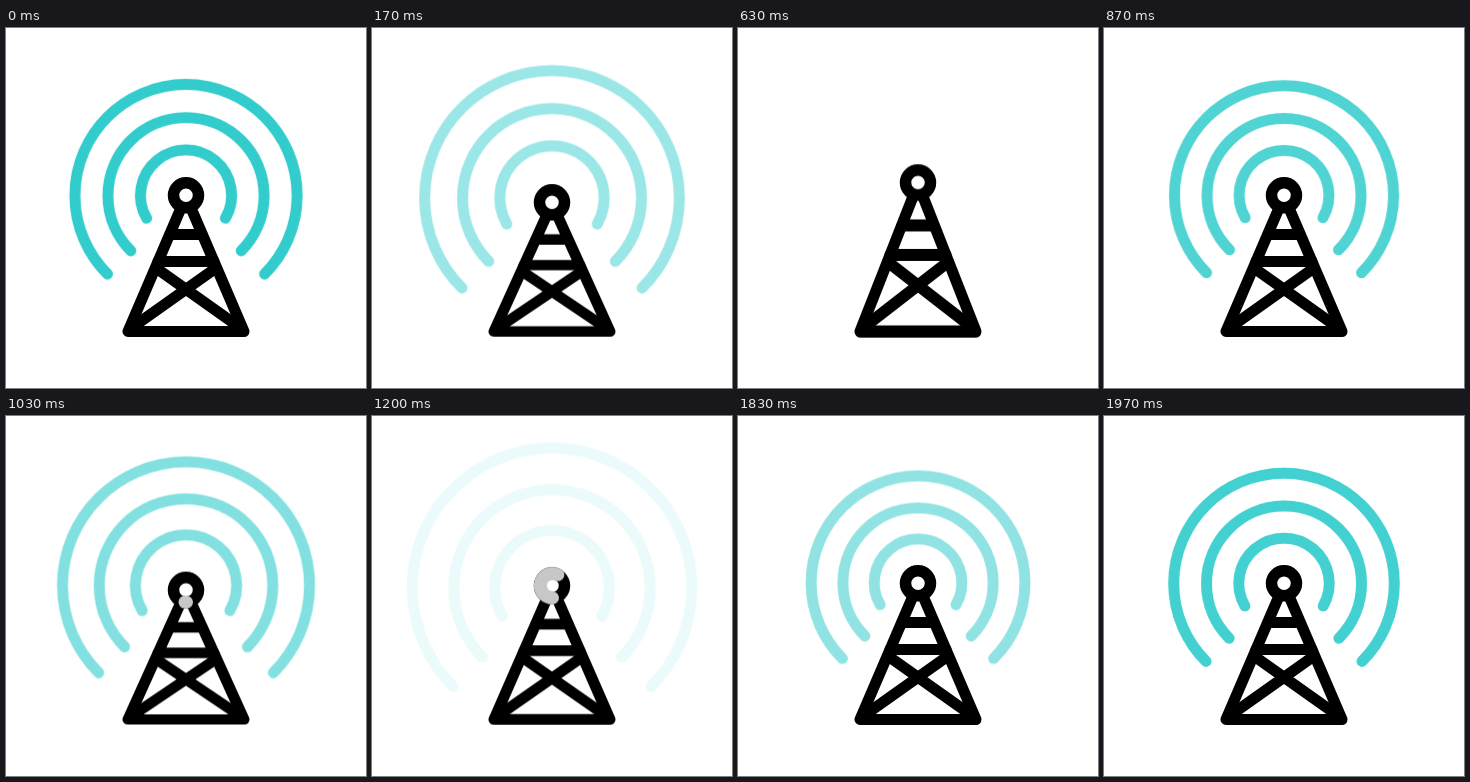
Recreate the animation shown at these times as an HTML page. Size 360 by 360 pixels, loop 2000 ms.

```html
<!DOCTYPE html>
<html lang="en">
<head>
<meta charset="utf-8">
<title>Radio tower</title>
<style>
  html, body { margin: 0; width: 100%; height: 100%; overflow: hidden; background: #fff; }
  svg { display: block; width: 100%; height: 100%; fill: none; stroke-linecap: round; stroke-linejoin: round; }

  .waves, .tower, .head { animation: 2s cubic-bezier(.333, 0, .667, 1) infinite; }

  .waves {
    stroke: #3cc;
    stroke-width: 11;
    transform-origin: 180px 151px;
    animation-name: pulse;
    animation-timing-function: linear;
  }
  .waves path { vector-effect: non-scaling-stroke; }

  .tower { stroke: #000; stroke-width: 11; transform-origin: 180px 303.5px; animation-name: stretch; }
  .head { animation-name: bob; }
  .ring { fill: #fff; stroke: #000; stroke-width: 11.5; }
  .glint {
    stroke: #c7c7c7;
    stroke-width: 13;
    animation: sweep 2s cubic-bezier(.333, 0, .667, 1) infinite, show 2s step-end infinite;
  }

  @keyframes pulse {
    0% { transform: scale(1); opacity: 1; }
    16.667% { transform: scale(1.287); opacity: 0; }
    16.668%, 35% { transform: scale(.91); opacity: 0; }
    45% { transform: scale(1); opacity: 1; }
    61.667% { transform: scale(1.287); opacity: 0; }
    61.668%, 81.667% { transform: scale(.92); opacity: 0; }
    100% { transform: scale(1); opacity: 1; }
  }
  @keyframes stretch {
    0%, 66.667%, 100% { transform: scaleY(1); }
    16.667% { transform: scaleY(.9); }
    33.333% { transform: scaleY(1.1); }
    50% { transform: scaleY(.95); }
  }
  /* Keeps the round head on top of the stretching mast. */
  @keyframes bob {
    0%, 66.667%, 100% { transform: translateY(0); }
    16.667% { transform: translateY(13.6px); }
    33.333% { transform: translateY(-13.6px); }
    50% { transform: translateY(6.8px); }
  }
  @keyframes sweep {
    0%, 50% { stroke-dasharray: 0 200; stroke-dashoffset: 0; }
    68.333% { stroke-dasharray: 100 200; stroke-dashoffset: 0; }
    83.333%, 100% { stroke-dasharray: 0 200; stroke-dashoffset: -100; }
  }
  @keyframes show {
    0% { opacity: 0; }
    50% { opacity: 1; }
    83.3% { opacity: 0; }
    100% { opacity: 0; }
  }
</style>
</head>
<body>
<svg viewBox="0 0 360 360">
  <g class="waves">
    <path d="M101.5 246A111 111 0 1 1 258.5 246"/>
    <path d="M124.8 222.7A78 78 0 1 1 235.2 222.7"/>
    <path d="M140.6 190.2A45.5 45.5 0 1 1 219.4 190.2"/>
  </g>
  <g class="tower">
    <path d="M175 180L122 303.5H238L185 180"/>
    <path d="M164 206.5H196M152 233.5H208"/>
    <path d="M150 240L236 301M210 240L124 301"/>
  </g>
  <g class="head">
    <circle class="ring" cx="180" cy="167.3" r="12.5"/>
    <path class="glint" pathLength="100" d="M180.5 179.5a12.2 12.2 0 0 1 0-24.4a12.2 12.2 0 0 1 0 24.4"/>
  </g>
</svg>
</body>
</html>
```
